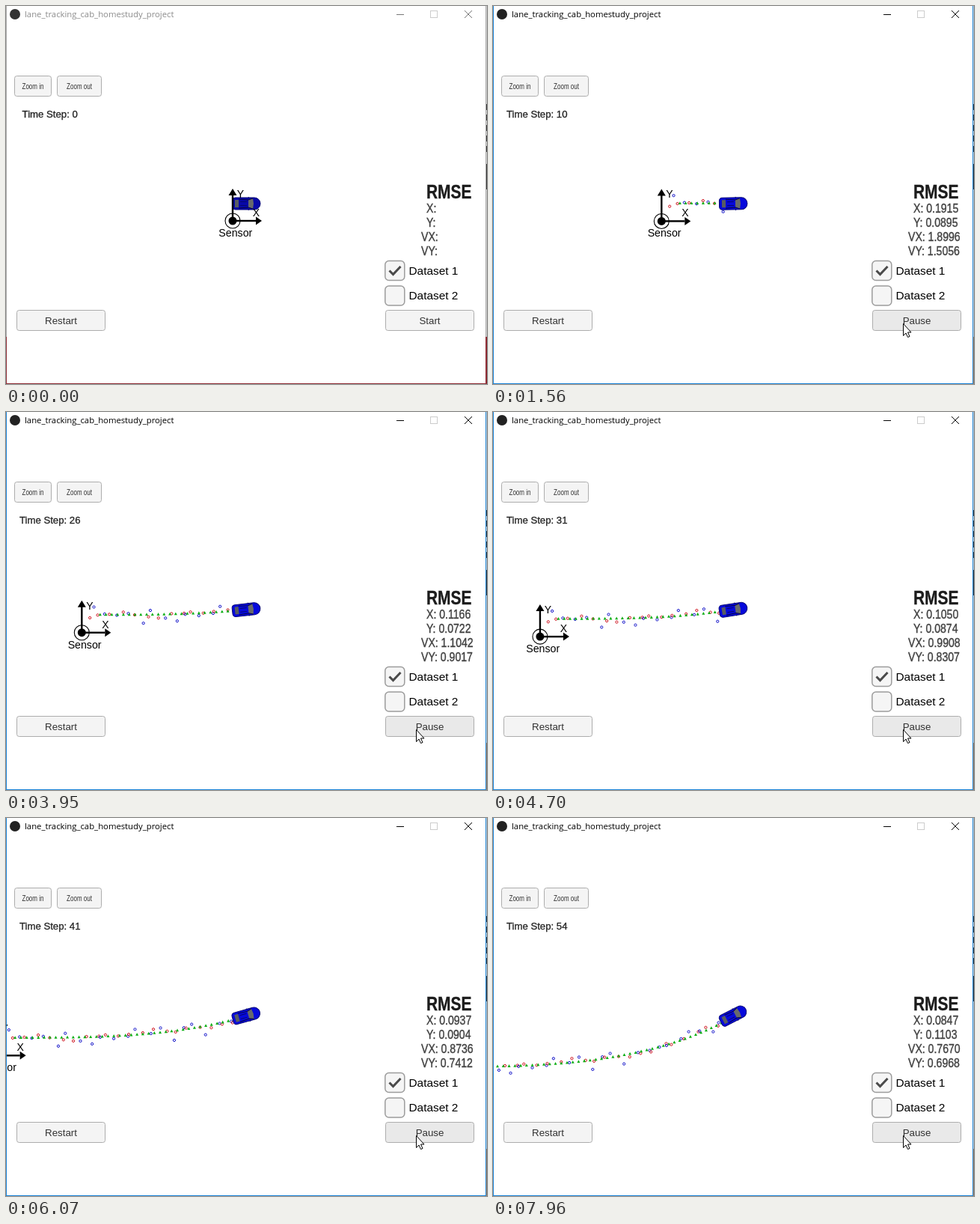
An HTML page with a canvas for the animation above (8 s loop, 643 by 505 pixels).

```html
<!DOCTYPE html>
<html lang="en">
<head>
<meta charset="utf-8">
<title>Sensor tracking</title>
<style>
  html, body { margin: 0; width: 100%; height: 100%; overflow: hidden; background: #fff; }
  canvas { display: block; }
</style>
</head>
<body>
<canvas id="stage" width="643" height="505"></canvas>
<script>
const ctx = document.getElementById('stage').getContext('2d');
const LOOP = 8000, ACTIVATE = 128, STEP_MS = 145.3;
const SANS = '"Liberation Sans", Arial, sans-serif';

// Key points of the displayed errors; power curves run between them.
const KEY_STEPS = [10, 17, 26, 31, 41, 54];
const ERRORS = {
  X: [.1915, .1459, .1166, .1050, .0937, .0847],
  Y: [.0895, .0795, .0722, .0874, .0904, .1103],
  VX: [1.8996, 1.3950, 1.1042, .9908, .8736, .7670],
  VY: [1.5056, 1.1206, .9017, .8307, .7412, .6968]
};

function errorAt(step, values) {
  const i = Math.max(1, KEY_STEPS.findIndex(key => key >= step));
  const from = KEY_STEPS[i - 1], to = KEY_STEPS[i];
  const part = Math.log(step / from) / Math.log(to / from);
  return values[i - 1] * (values[i] / values[i - 1]) ** part;
}

// Distance travelled by the car, in pixels, after k steps.
const travelX = k => 7.77 * k - 2.74e-8 * k ** 5;
const travelY = k => 4.4e-4 * k ** 3;
const trailX = k => 9 + travelX(k);
const trailY = k => -24 - travelY(k - 2);

// Repeatable noise from -1 to 1.
function noise(seed) {
  const n = Math.sin(seed * 12.9898) * 43758.5453;
  return 2 * (n - Math.floor(n)) - 1;
}

function text(str, x, y, size, { color = '#000', align = 'left', weight = '', family = SANS, narrow = 1, bolder = 0 } = {}) {
  ctx.save();
  ctx.translate(x, y);
  ctx.scale(narrow, 1);
  ctx.font = `${weight} ${size}px ${family}`;
  ctx.textAlign = align;
  ctx.fillStyle = ctx.strokeStyle = color;
  ctx.fillText(str, 0, 0);
  if (bolder) {
    ctx.lineWidth = bolder;
    ctx.strokeText(str, 0, 0);
  }
  ctx.restore();
}

function trace(points) {
  ctx.beginPath();
  for (let i = 0; i < points.length; i += 2) ctx.lineTo(points[i], points[i + 1]);
}

function line(points, color, width = 1) {
  trace(points);
  ctx.strokeStyle = color;
  ctx.lineWidth = width;
  ctx.stroke();
}

function polygon(points, fill) {
  trace(points);
  ctx.fillStyle = fill;
  ctx.fill();
}

function box(x, y, w, h, radius, fill, stroke, width = 1) {
  ctx.beginPath();
  ctx.roundRect(x, y, w, h, radius);
  ctx.fillStyle = fill;
  ctx.fill();
  ctx.strokeStyle = stroke;
  ctx.lineWidth = width;
  ctx.stroke();
}

function disc(x, y, r, fill) {
  ctx.beginPath();
  ctx.arc(x, y, r, 0, 7);
  ctx.fillStyle = fill;
  ctx.fill();
}

function ring(x, y, r, color, width = 1) {
  ctx.beginPath();
  ctx.arc(x, y, r, 0, 7);
  ctx.strokeStyle = color;
  ctx.lineWidth = width;
  ctx.stroke();
}

// Laser readings (red) alternate with the wider spread radar readings (blue).
function drawMarkers(step) {
  for (let k = 0; k < step; k++) {
    const laser = k % 2 === 0;
    const scatter = noise(k + 1);
    const x = trailX(k) + 4 * noise(k + 80);
    const y = trailY(k) + (laser ? 5 * scatter : 13 * scatter * Math.abs(scatter));
    ring(x, y, 1.6, laser ? '#d0101c' : '#0c0cc8');
  }
  for (let k = 2; k <= step; k++) {
    const x = trailX(k), y = trailY(k);
    polygon([x, y - 2.2, x + 2, y + 1.6, x - 2, y + 1.6], '#0cae14');
  }
}

function drawSensor() {
  line([0, 0, 0, -36], '#000', 2.4);
  line([0, 0, 31, 0], '#000', 2.4);
  polygon([0, -43, 5.5, -34, -5.5, -34], '#000');
  polygon([39, 0, 31, 5.5, 31, -5.5], '#000');
  ring(0, 0, 10, '#000', 1.1);
  disc(0, 0, 5.5, '#000');
  text('Y', 10.5, -31, 14, { align: 'center' });
  text('X', 31.5, -6, 14, { align: 'center' });
  text('Sensor', 3.8, 21, 14.2, { align: 'center' });
}

function drawCar(step, active) {
  ctx.save();
  ctx.translate(321, 264);
  ctx.rotate(-27 * Math.PI / 180 * (step / 54) ** 2);
  box(-18.5, -8, 37.5, 16, [4, 8, 8, 4], active ? '#0609dc' : '#0808a8', '#080878');
  polygon([-15, -5, -10, -5, -10, 5, -15, 5], '#585c62');
  polygon([3, -5, 9, -7, 10, 0, 9, 7, 3, 5], '#686a6c');
  for (const side of [-1, 1]) {
    line([-10, 6 * side, 3, 5 * side, 9, 7 * side], '#060640');
    line([-8, 2.5 * side, 1, 2.5 * side], '#060670');
    line([3, 9 * side, 4, 7 * side], '#080878');
  }
  ctx.restore();
}

function drawButton(label, x, y, w, { fill = '#f4f4f4', size = 13.3, baseline = 19, narrow = 1 } = {}) {
  box(x + .5, y + .5, w - 1, 27, 3, fill, '#adadad');
  text(label, x + w / 2, y + baseline, size, { color: '#323232', align: 'center', narrow });
}

function drawControls(step, active) {
  const small = { size: 11, baseline: 18, narrow: .73 };
  drawButton('Zoom in', 11, 93, 50, small);
  drawButton('Zoom out', 68, 93, 60, small);
  drawButton('Restart', 14, 406, 119);
  drawButton(active ? 'Pause' : 'Start', 507, 406, 119, { fill: active ? '#e9e9e9' : '#f4f4f4' });
  text('Time Step: ' + step, 58.7, 149, 13.2, { color: '#222', align: 'center', bolder: .3 });

  text('RMSE', 562, 256.5, 26.5, { color: '#1c1c1c', weight: 'bold', narrow: .79, bolder: .4 });
  Object.entries(ERRORS).forEach(([name, values], row) => {
    const value = step > 0 ? ' ' + errorAt(step, values).toFixed(4) : '';
    text(name + ':' + value, name.length > 1 ? 555 : 562, 276 + 19 * row, 16,
      { color: '#404040', narrow: .88, bolder: .4 });
  });

  [340, 373.5].forEach((y, i) => {
    box(506.8, y + .5, 26, 26, 5, '#f5f5f5', '#9c9c9c', 1.5);
    text('Dataset ' + (i + 1), 538.5, y + 18.5, 15.4);
  });
  line([512.5, 353.5, 517.5, 358.5, 527.5, 348], '#4a4a4a', 3);
}

function drawWindow(active) {
  const ink = active ? '#000' : '#777';
  disc(12, 11, 7, active ? '#222' : '#333');
  text('lane_tracking_cab_homestudy_project', 25, 15, 11.3,
    { color: active ? '#000' : '#8c8c8c', family: '"Open Sans", sans-serif' });
  line([522, 11.5, 532, 11.5], ink);
  ctx.strokeStyle = '#ccc';
  ctx.strokeRect(567.5, 6.5, 9, 9);
  line([613, 6, 623, 16], ink);
  line([623, 6, 613, 16], ink);

  const upper = active ? '#1883d7' : '#a8a8a8', lower = active ? '#1883d7' : '#8e2c34';
  for (const x of [.5, 641.5]) {
    line([x, 0, x, 442], upper);
    line([x, 442, x, 505], lower);
  }
  line([0, 504.5, 642, 504.5], lower);

  // Sliver of the desktop beside the window.
  line([642.5, 0, 642.5, 442], '#d0d0d0');
  line([642.5, 211, 642.5, 245], '#383838');
  ctx.setLineDash([8, 6]);
  line([642.5, 131, 642.5, 195], '#383838');
  ctx.setLineDash([]);
  line([642.5, 442, 642.5, 505], active ? '#b08058' : '#8e2c34');
}

function drawCursor() {
  const outline = [548.5, 424.5, 548.5, 440.5, 552, 437, 554.5, 442.5, 557, 441.5, 554.5, 436, 559, 436, 548.5, 424.5];
  polygon(outline, '#fff');
  line(outline, '#000');
}

function render() {
  const time = performance.now() % LOOP;
  const active = time >= ACTIVATE;
  const step = Math.max(0, Math.floor(10 + (time - 1555) / STEP_MS));

  ctx.fillStyle = '#fff';
  ctx.fillRect(0, 0, 643, 505);

  const besideSensor = draw => {
    ctx.save();
    ctx.translate(303 - travelX(step), 287 + travelY(step));
    draw(step);
    ctx.restore();
  };
  besideSensor(drawMarkers);
  drawCar(step, active);
  besideSensor(drawSensor);

  drawControls(step, active);
  drawWindow(active);
  if (active) drawCursor();
  requestAnimationFrame(render);
}
render();
</script>
</body>
</html>
```
